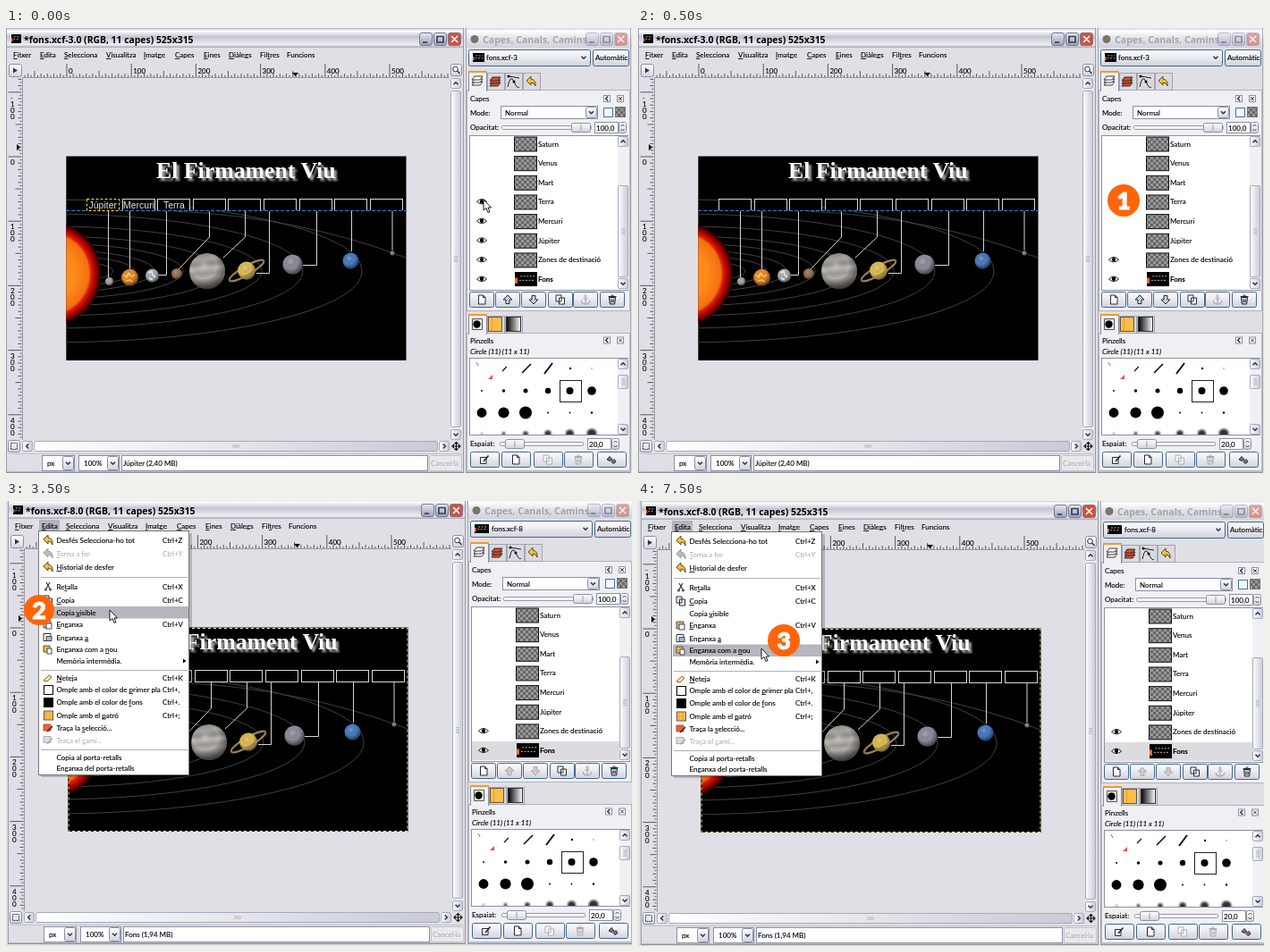
These frames come from a looping animation (700 by 498 pixels, 8000 ms). An HTML page:

```html
<!DOCTYPE html>
<html lang="ca">
<head>
<meta charset="utf-8">
<title>Editor d'imatges</title>
<style>
html, body { margin: 0; width: 100%; height: 100%; overflow: hidden; background: #e0dfe5; }
svg { display: block; width: 700px; height: 498px; }
text { font: 8px Lato, sans-serif; white-space: pre; fill: #000; stroke: #000; stroke-width: .12px; }
text.off { fill: #a5a5ad; stroke: none; }
text.bold { font-weight: bold; }
text.italic { font-style: italic; }
text.title { font: bold 10.4px "Noto Sans", sans-serif; stroke: none; }
text.dock { font: bold 10.6px "Noto Sans", sans-serif; fill: #a4a4ab; stroke: none; }
text.heading { font: bold 25.8px "Liberation Serif", serif; fill: #fff; stroke: none; }
text.label { font: 10.5px "Liberation Sans", sans-serif; fill: #e4e4e4; stroke: none; }
text.badge { font: 900 27px Lato, sans-serif; fill: #fff; stroke: #fff; stroke-width: .8px; text-anchor: middle; }
</style>
</head>
<body>
<svg viewBox="0 0 700 498">
  <defs>
    <linearGradient id="bar" x2="0" y2="1">
      <stop stop-color="#b4b4c4"/><stop offset=".14" stop-color="#fff"/><stop offset=".45" stop-color="#c4c4d2"/>
      <stop offset=".85" stop-color="#eeeef3"/><stop offset="1" stop-color="#a6a6b6"/>
    </linearGradient>
    <linearGradient id="idle" x2="0" y2="1">
      <stop stop-color="#d4d4dc"/><stop offset=".15" stop-color="#fff"/><stop offset=".5" stop-color="#e4e4ec"/>
      <stop offset="1" stop-color="#d2d2dc"/>
    </linearGradient>
    <linearGradient id="button" x2="0" y2="1"><stop stop-color="#fff"/><stop offset="1" stop-color="#d2d2de"/></linearGradient>
    <linearGradient id="frame" x2="0" y2="1"><stop stop-color="#e6e7f0"/><stop offset="1" stop-color="#9a9fba"/></linearGradient>
    <linearGradient id="thumb" x2="1"><stop stop-color="#fff"/><stop offset="1" stop-color="#cacad8"/></linearGradient>
    <linearGradient id="fade"><stop/><stop offset="1" stop-color="#fff"/></linearGradient>
    <radialGradient id="sun">
      <stop offset=".5" stop-color="#ff8a1c"/><stop offset=".77" stop-color="#f4700f"/><stop offset=".82" stop-color="#d81804"/>
      <stop offset=".9" stop-color="#a00"/><stop offset="1" stop-color="#200"/>
    </radialGradient>
    <radialGradient id="shade" cx=".4" cy=".35" r=".65">
      <stop stop-color="#fff" stop-opacity=".3"/><stop offset=".55" stop-opacity="0"/><stop offset="1" stop-opacity=".5"/>
    </radialGradient>
    <linearGradient id="bands" x2=".1" y2="1">
      <stop stop-color="#85827d"/><stop offset=".2" stop-color="#aeaca8"/><stop offset=".34" stop-color="#94908b"/>
      <stop offset=".46" stop-color="#bfbdba"/><stop offset=".6" stop-color="#a49d96"/><stop offset=".72" stop-color="#b4b2ae"/>
      <stop offset="1" stop-color="#75726e"/>
    </linearGradient>
    <pattern id="checker" width="6" height="6" patternUnits="userSpaceOnUse">
      <path d="M0 0h6v6h-6z" fill="#999"/><path d="M0 0h3v3h-3zM3 3h3v3h-3z" fill="#666"/>
    </pattern>
    <filter id="soft"><feGaussianBlur stdDeviation="1.3"/></filter>
    <clipPath id="picture"><path d="M67.300 143.600h380.200v228.400h-380.200z"/></clipPath>
    <clipPath id="brushes"><path d="M520 370h164v85h-164z"/></clipPath>
  </defs>
  <g id="stage"></g>
</svg>
<script>
const GREY = '#e0dfe5', PAGE = '#f0f0f4', EDGE = '#8a90a4', BLUE = '#42688f', ORANGE = '#ff6508', OFF = '#aaaab2';
const SCALE = 0.722;

const path = (d, stroke = '#000', width = 1, fill = 'none', extra = '') =>
  `<path d="${d}" stroke="${stroke}" stroke-width="${width}" fill="${fill}" ${extra}/>`;
const fill = (x, y, w, h, color) => `<rect x="${x}" y="${y}" width="${w}" height="${h}" fill="${color}"/>`;
const box = (x, y, w, h, color, edge = EDGE, r = 0) =>
  `<rect x="${x + .5}" y="${y + .5}" width="${w - 1}" height="${h - 1}" rx="${r}" fill="${color}" stroke="${edge}"/>`;
const dot = (x, y, r, color = '#000', extra = '') => `<circle cx="${x}" cy="${y}" r="${r}" fill="${color}" ${extra}/>`;
const at = (x, y, content) => `<g transform="translate(${x} ${y})">${content}</g>`;
// An underscore marks the letter that is underlined.
const text = (x, y, s, cls = '') =>
  `<text x="${x}" y="${y}" class="${cls}">${s.replace(/_(.)/, '<tspan text-decoration="underline">$1</tspan>')}</text>`;
const each = (list, draw) => list.map(draw).join('');
const range = n => [...Array(n).keys()];
const button = (x, y, w, h, edge = BLUE) => box(x, y, w, h, 'url(#button)', edge, 2);
const chevron = (x, y, angle = 0) =>
  path('M-2.5-1.2L0 1.3L2.5-1.2', '#2c3448', 1.5, 'none', `transform="translate(${x} ${y}) rotate(${angle})"`);

const icons = {
  page: c => path('M-3.5-5h5l2.5 2.5v7.5h-7.5zM1.5-5v2.5h2.5', c, 1, '#fff'),
  up: c => path('M0-5L5 0H2V4.500H-2V0H-5z', c, 1, c === OFF ? '#ccc' : '#c4d2e4'),
  down: c => `<g transform="scale(1 -1)">${icons.up(c)}</g>`,
  copy: c => path('M-5-5h6v7h-6zM-1.500-2h6v7h-6z', c, 1, '#fff'),
  anchor: c => path('M0-3V5M-5 1Q-4 5 0 5Q4 5 5 1M-2.500-1H2.500', c, 1.2) + `<circle cy="-4" r="1.300" fill="none" stroke="${c}"/>`,
  trash: c => path('M-3.500-2.500h7l-.8 7.500h-5.400zM-4.500-3.500h9M-1.500-4.800h3M-1 0v3M1.200 0v3', c, 1, c === OFF ? '#ddd' : '#b4bcc6'),
  edit: c => path('M-4.500-2.500h6.500v7h-6.500z', c, 1, '#fff') + path('M-1 2L4.500-4.500', c, 1.6),
  refresh: c => path('M-5 0L-2-3.500L1 0L-2 1.500zM0 2.500L3-.5L5 2.500L2 4.500z', c, 1, '#778'),
  undo: c => path('M-5-1L0-6V-3Q6-2 5 5Q3.500 .5 0 1V4z', c === OFF ? '#999' : '#4d3c14', .9, c === OFF ? '#bbb' : '#f3c33c'),
  cut: () => path('M-2-5L2 2M2-5L-2 2', '#333', 1.2) + dot(-2.5, 3, 1.6, '#555') + dot(2.5, 3, 1.6, '#555'),
  paste: () => path('M-5-4h8v8h-8z', '#654', 1, '#c9ad78') + path('M-2-1h6v6h-6z', '#445', 1, '#fff'),
  pasteInto: () => path('M-5-4h8v8h-8z', '#333', 1, '#fff') + path('M-2-1h6v5h-6z', '#445', 1, '#aab8d0'),
  pasteNew: () => path('M-5-4h7v7h-7z', '#654', 1, '#e7bc48') + path('M-1-1h5v6h-5z', '#445', 1, '#fff'),
  clear: () => path('M-5 3L1-3L4-1L-1 4z', '#86653b', 1, '#f4e29a'),
  white: () => box(-5, -5, 11, 11, '#fff', '#000'),
  black: () => fill(-5, -5, 11, 11, '#000'),
  pattern: () => box(-5, -5, 11, 11, '#ffbd4a', '#654') + path('M-2-4V5M2-4V5', '#e99d2b', 1),
  stroke: c => path('M-5-4h8v7h-8z', c === OFF ? OFF : '#c44', 1, c === OFF ? '#ddd' : '#e8642c') + path('M-1 4L5-2', c, 1.5),
};
const icon = (name, x, y, color = '#222a36') => at(x, y, icons[name](color));

const eye = y => path(`M526.500 ${y}Q532 ${y - 6} 537.500 ${y}Q532 ${y + 5} 526.500 ${y}z`, '#222', 1, '#fff') + dot(532, y - .3, 2.2);
const pointer = (x, y) => at(x, y, path('M0 0V12L3 9.500L5 14.500L7 13.500L5 9H8.500z', '#000', .9, '#fff'));
const badge = (x, y, n, r = 18) => dot(x, y, r, ORANGE) + text(x, y + 10, n, 'badge');
const thumbnail = (x, y, w, h) => fill(x, y, w, h, '#000') + fill(x, y + h * .4, w * .12, h * .4, ORANGE)
  + path(`M${x + w * .25} ${y + h * .3}H${x + w * .9}M${x + w * .2} ${y + h * .58}H${x + w * .85}`, '#bbb', 1, 'none', 'stroke-dasharray="2 1.5"');

function scrollbar(x, y, length, from, to, vertical) {
  const size = 12, mid = (from + to) / 2;
  const bar = (a, n, style) => vertical ? box(x, a, size, n, style, '#a6aabc', 1.5) : box(a, y, n, size, style, '#a6aabc', 1.5);
  const start = vertical ? y : x, end = start + length;
  const grip = each([-3, -1, 1, 3], d => vertical
    ? path(`M${x + 4} ${mid + d}h4`, '#9aa', .7) : path(`M${mid + d} ${y + 4}v4`, '#9aa', .7));
  return (vertical ? fill(x, y, size, length, '#f1f1f5') : fill(x, y, length, size, '#f1f1f5'))
    + bar(from, to - from, 'url(#thumb)') + grip + bar(start, size, 'url(#thumb)') + bar(end - size, size, 'url(#thumb)')
    + (vertical ? chevron(x + 6, y + 6, 180) + chevron(x + 6, end - 6) : chevron(x + 6, y + 6, 90) + chevron(end - 6, y + 6, -90));
}

const windowButton = (x, mark, color, ink) => box(x - 7, 5, 15, 15, color, '#777b90', 2.5)
  + path(mark, ink, 1.7, 'none', `transform="translate(${x + .5} 12.500)"`);
const windowButtons = (x, active) => `<g opacity="${active ? 1 : .5}">`
  + windowButton(x - 32, 'M-3.500 3.500H1.500', 'url(#frame)', '#3b3f52')
  + windowButton(x - 16, 'M-3.500-3h7v6.500h-7z', 'url(#frame)', '#3b3f52')
  + windowButton(x, 'M-3.500-3.500L3.500 3.500M3.500-3.500L-3.500 3.500', '#d5503e', '#fff') + '</g>';

function rulers() {
  let out = '';
  const tick = u => u % 100 === 0 ? 15 : u % 50 === 0 ? 7 : u % 10 === 0 ? 4 : 2;
  for (let u = -65; u <= 590; u += 5) {
    const x = 68 + u * SCALE;
    out += path(`M${x} 55v${-tick(u)}`, '#222', .7);
    if (u >= 0 && u % 100 === 0) out += text(x + 2, 50.5, `${u}`);
  }
  for (let u = -120; u <= 435; u += 5) {
    const y = 144 + u * SCALE;
    out += path(`M17.500 ${y}h${-tick(u)}`, '#222', .7);
    if (u % 100 === 0) out += each([...`${u}`], (c, i) => text(5, y + 9 + i * 7, c));
  }
  return out + path('M320 50h7l-3.500 4z', 'none', 0, '#000') + path('M12 130v7l4-3.500z', 'none', 0, '#000');
}

function solarPicture(guide, labels) {
  const orbits = [[72, 13], [96, 18], [118, 24], [150, 31], [190, 39], [238, 50], [284, 64], [350, 80]];
  const leaders = ['M114.500 205V279', 'M138.500 205V270', 'M179.500 205V276.500H171', 'M227.500 205V234L193 270',
    'M267.500 205V234L243 257', 'M294.500 205V274.500H280', 'M347.500 205V265.500H332', 'M386.500 205V250', 'M432 205V249'];
  const planets = [[115.500, 283.500, 4.5, '#a5a5a5'], [138.500, 279, 9.3, '#e58a2c'], [163.500, 277, 7.5, '#a6acb4'],
    [191, 275, 6, '#99765b'], [225, 272, 20, 'url(#bands)'], [269, 271.500, 10, '#dfbd55'],
    [320.500, 264.500, 11, '#8d8d9d'], [385.500, 260.500, 9, '#487cc0'], [432, 252, 2.5, '#8b8580']];
  const ring = half => path(`M-22 0A22 5 0 0 ${half} 22 0`, '#9a8358', 2.2, 'none', 'transform="translate(269 271.500) rotate(-30)"');
  const dashed = (d, color, dash) => path(d, '#000') + path(d, color, 1, 'none', `stroke-dasharray="${dash}"`);
  return `<g clip-path="url(#picture)">` + fill(67, 143, 381, 230, '#000')
    + each(orbits, ([rx, ry]) => `<ellipse cx="48" cy="272" rx="${rx}" ry="${ry}" fill="none" stroke="#404040"/>`)
    + path('M190 205Q330 212 447 257', '#404040')
    + dot(48, 275, 58, 'url(#sun)')
    + `<g filter="url(#soft)" opacity=".65">${text(171, 171, 'El Firmament Viu', 'heading')}</g>`
    + text(168, 168, 'El Firmament Viu', 'heading')
    + each(leaders, d => path(d, '#d4d4d4'))
    + each(range(9), i => box(Math.round(90 + i * 39.6), 191, 37, 14, '#000', '#d8d8d8'))
    + each(planets, ([x, y, r, color], i) => (i === 5 ? ring(1) : '') + dot(x, y, r, color) + dot(x, y, r, 'url(#shade)') + (i === 5 ? ring(0) : ''))
    + path('M132 276l3 3l2-5l3 4l4-2M134 283l4-1l4 2', '#ffcc50', 1.3)
    + path('M159 274l4-2l1 4l3 3M160 280l4 2', '#e8e8e8', 1.5)
    + (guide ? dashed('M67 204.500H448', '#2a82e0', '4 2') : dashed('M68 144.500h379v227h-379z', '#f5ec9a', '3 3'))
    + (labels ? dashed('M90.500 191.500h36v13h-36z', '#ffe84a', '3 2') + text(92.5, 202, 'Júpiter', 'label')
      + text(131, 202, 'Mercuri', 'label') + text(176, 202, 'Terra', 'label') : '')
    + '</g>';
}

const menuBar = [[8, '_Fitxer'], [38, '_Edita'], [65, '_Selecciona'], [112, '_Visualitza'], [154, '_Imatge'], [189, '_Capes'],
  [221, '_Eines'], [249, '_Diàlegs'], [284, 'Fil_tres'], [314, 'Funcions']];

function mainWindow({ version, status, guide, labels }) {
  return fill(0, 0, 512, 22, 'url(#bar)') + path('M.5 -4V497H511.500V-4', '#9a9aaa')
    + thumbnail(6, 7, 11, 10) + text(20, 17, `*fons.xcf-${version}.0 (RGB, 11 capes) 525x315`, 'title')
    + windowButtons(501, true)
    + (guide ? '' : fill(35, 23, 23, 13, '#b4b4be'))
    + each(menuBar, ([x, s]) => text(x, 33, s))
    + rulers() + button(3, 40, 15, 15, EDGE) + path('M8 44.500l5 3l-5 3z', 'none', 0, '#334')
    + path('M18.500 461V55.500H496', '#99a')
    + button(497, 40, 13, 14, EDGE) + `<circle cx="502.500" cy="46" r="2.800" fill="#fff" stroke="#334"/>` + path('M504.500 48l3 3', '#334', 1.4)
    + solarPicture(guide, labels)
    + scrollbar(497, 56, 405, 70, 447, true) + scrollbar(18, 462, 478, 31, 483, false)
    + button(2, 461, 14, 14, EDGE) + path('M5.500 464.500h7v7h-7z', '#334', 1, 'none', 'stroke-dasharray="2 1"')
    + path('M499 468h9M503.500 463.500v9M501.500 465.500l2-2l2 2M501.500 470.500l2 2l2-2M501 466l-2 2l2 2M506 466l2 2l-2 2', '#111', 1.1)
    + path('M2 476.500H510', '#c4c4cc')
    + box(40, 478, 37, 18, '#fff') + text(46, 490, 'px') + button(63, 479, 13, 16, EDGE) + chevron(69.5, 487)
    + box(81, 478, 46, 18, '#fff') + text(87, 490, '100%') + button(113, 479, 13, 16, EDGE) + chevron(119.5, 487)
    + box(129, 478, 343, 18, '#fff') + text(131, 490, status)
    + box(473, 478, 37, 18, '#e9e9ed', '#c4c4ca', 2) + text(475, 490, 'Cancel·la', 'off');
}

const tabs = (y, count, bottom) => box(515, y + 21, 183, bottom - y - 21, PAGE, '#b0b2c0')
  + box(517, y, 21, 23, PAGE) + fill(518, y + 20, 19, 3, PAGE) + fill(517, y, 21, 2, '#f39b28')
  + each(range(count - 1), i => box(538 + i * 20, y + 2, 20, 20, '#d9d9e0', '#a5a5b3'));
const panelHead = (y, s) => text(519, y, s) + box(668, y - 7, 8, 8, '#fff') + chevron(672, y - 3, 90)
  + box(683, y - 7, 8, 8, '#fff') + path(`M685 ${y - 5}l4 4m0-4l-4 4`, '#333');
const spin = (x, y, s) => box(x, y, 27, 13, '#fff') + text(x + 2, y + 9.5, s) + button(x + 27, y, 9, 13, EDGE)
  + path(`M${x + 29.500} ${y + 5}l2-2l2 2M${x + 29.500} ${y + 8}l2 2l2-2`, '#445');
const slider = (x, y, w, knob) => box(x, y - 2, w, 5, '#f3f3f6', '#9a9aaa', 1) + button(knob, y - 5, 22, 11, EDGE)
  + path(`M${knob + 11} ${y - 3}v7`, '#99a');
const stack = (x, y, color) => each([3, 0, -3], d => path(`M${x - 6} ${y + d + 2}l3-4h9l-3 4z`, '#222', .9, color));

function brushes() {
  const columns = [532, 556.5, 581, 606, 630.5, 655];
  const radii = [[1, 1.7, 2.5, 3.2, 4, 4.8], [5.4, 6.1, 7, 1, .9, 1.2]];
  return '<g clip-path="url(#brushes)">'
    + path('M526 374l2 4', '#777') + path('M555 384l5-5', '#111', 1.2) + path('M577 386l10-10', '#111', 1.6)
    + path('M602 387l9-12', '#111', 2) + dot(631, 381, 1.2) + dot(655, 381, .8, '#888')
    + path('M544 388v5h-5z', 'none', 0, '#e5533d')
    + box(619, 394, 25, 25, '#fff', '#222')
    + each(radii, (row, j) => each(row, (r, i) => dot(columns[i], 406 + j * 24.5, r)))
    + `<g filter="url(#soft)">${each(columns, (x, i) => dot(x, 454, 1 + i * .9, '#333'))}</g></g>`;
}

function dockWindow({ version, eyes, selected }) {
  const layers = ['Saturn', 'Venus', 'Mart', 'Terra', 'Mercuri', 'Júpiter', 'Zones de destinació', 'Fons'];
  const rowY = i => 129.5 + i * 21.65;
  const quiet = selected ? OFF : undefined;
  const layerButtons = [['page', 532], ['up', 561, quiet], ['down', 590, quiet], ['copy', 620], ['anchor', 648, OFF], ['trash', 678]];
  const brushButtons = [['edit', 535], ['page', 570], ['copy', 606, OFF], ['trash', 640, OFF], ['refresh', 677]];
  return fill(514, 0, 186, 22, 'url(#idle)') + path('M514.500 -4V497H698.500V-4', '#a9a9b6')
    + dot(524, 12.5, 4.5, '#7c7468') + text(533, 17, 'Capes, Canals, Camins...', 'dock') + windowButtons(687, false)
    + button(517, 24, 137, 19) + thumbnail(522, 28, selected ? 16 : 13, 10) + text(selected ? 541 : 537, 36, `fons.xcf-${version}`) + chevron(646, 33)
    + button(656, 24, 41, 19) + text(659, 36, 'Automàtic')
    + tabs(48, 4, 317) + stack(527, 59, '#fff') + stack(547, 60, '#d84b32')
    + path('M561 66Q564 51 568 60T574 66M562 54L574 56', '#222') + dot(562, 54, 1.5) + dot(568, 60, 1.5) + icon('undo', 587, 60)
    + panelHead(82, 'Capes')
    + text(519, 97.5, 'Mode:') + box(553, 87, 109, 15, '#fff') + text(558, 97.5, 'Normal') + button(648, 88, 13, 13, EDGE) + chevron(654.5, 94.5)
    + box(668, 89, 11, 11, '#f4f8ff', '#4a719b') + box(681, 88, 12, 12, 'url(#checker)', '#777')
    + text(519, 114, 'Opacitat:') + slider(554, 111, 101, 632) + spin(658, 105, '100,0')
    + box(518, 120, 178, 174, '#fff') + (selected ? fill(519, 271, 165, 21, '#dcdce0') : '')
    + each(layers, (name, i) => {
      const y = rowY(i), last = i === 7;
      return (last ? thumbnail(569, y - 8, 25, 16) : box(568, y - 8, 26, 17, 'url(#checker)', '#111'))
        + text(595, y + 3, name, last ? 'bold' : '') + (i >= eyes ? eye(y) : '');
    })
    + scrollbar(684, 121, 171, 176, 279, true)
    + each(layerButtons, ([name, x, color]) => button(x - 14, 295, 28, 18) + icon(name, x, 304, color))
    + tabs(320, 3, 496) + dot(526.5, 331.5, 4.2) + path('M521.500 325.500h11v12h-11z', '#555')
    + box(539, 323, 16, 17, '#ffbd4a', '#654') + path('M543.500 324v15', '#ec9c31') + box(559, 323, 17, 17, 'url(#fade)', '#333')
    + panelHead(352.5, 'Pinzells') + text(519, 364.5, 'Circle (11) (11 x 11)', 'italic')
    + box(518, 369, 178, 87, '#fff') + brushes() + scrollbar(684, 370, 85, 388, 404, true)
    + text(519, 467.5, 'Espaiat:') + slider(552, 465, 94, 558) + spin(650, 459, '20,0')
    + each(brushButtons, ([name, x, color]) => button(x - 16, 474, 33, 18) + icon(name, x, 483, color));
}

// Rows: y, label, shortcut, icon, disabled
const menuRows = [[46, 'Desfés Selecciona-ho tot', 'Ctrl+Z', 'undo'], [61, '_Torna a fer', 'Ctrl+Y', 'undo', true],
  [76, '_Historial de desfer', '', 'undo'], [98, 'Re_talla', 'Ctrl+X', 'cut'], [113, '_Copia', 'Ctrl+C', 'copy'], [126.5, 'Copia _visible'],
  [140, '_Enganxa', 'Ctrl+V', 'paste'], [154.5, 'Enganxa _a', '', 'pasteInto'], [168, 'Enganxa com a _nou', '', 'pasteNew'],
  [181, 'Memòria intermèdia.'], [200, '_Neteja', 'Ctrl+K', 'clear'], [213, 'Omple amb el color de _primer pla', 'Ctrl+,', 'white'],
  [227, 'Omple amb el color de _fons', 'Ctrl+.', 'black'], [241.5, 'Omple amb el _patró', 'Ctrl+;', 'pattern'],
  [256, 'Traça la _selecció...', '', 'stroke'], [269.5, 'Traça el _camí...', '', 'stroke', true],
  [289, 'Copia al porta-retalls'], [301, 'Enganxa del porta-retalls']];

function editMenu(hover) {
  return fill(37, 38, 169, 273, '#0003') + box(34, 35, 169, 274, '#fff', '#777')
    + fill(36, menuRows[hover][0] - 6.5, 166, 13.5, '#b6b6be')
    + each([87, 191, 280], y => path(`M37 ${y + .5}H201`, '#b0b0b8'))
    + each(menuRows, ([y, label, keys = '', art, off]) => {
      const cls = off ? 'off' : '';
      return (art ? icon(art, 45, y, off ? OFF : undefined) : '') + text(54.5, y + 3, label, cls) + text(173, y + 3, keys, cls);
    })
    + path('M196 178.500l3.500 2.500l-3.500 2.500z', 'none', 0, '#000');
}

const first = { version: 3, status: 'Júpiter (2,40 MB)', guide: true, selected: false, offset: [0, 0] };
const later = { version: 8, status: 'Fons (1,94 MB)', guide: false, selected: true, eyes: 6 };
const scenes = [
  { ...first, until: 500, labels: true, eyes: 3, overlay: pointer(534, 192) },
  { ...first, until: 3500, labels: false, eyes: 6, overlay: badge(543, 193, '1') },
  { ...later, until: 7500, offset: [2, -2], hover: 5, overlay: badge(37, 122, '2', 17) + pointer(116, 122) },
  { ...later, until: 8000, offset: [3, -1], hover: 8, overlay: badge(163, 156, '3') + pointer(138, 165) },
];
const pictures = scenes.map(s => fill(0, 0, 700, 498, GREY)
  + at(...s.offset, mainWindow(s) + dockWindow(s) + path('M0 497.500H512M514 497.500H699', '#8e8e9c') + (s.hover ? editMenu(s.hover) : ''))
  + s.overlay);

const stage = document.getElementById('stage');
let shown = -1;
function draw() {
  const time = performance.now() % 8000;
  const index = scenes.findIndex(s => time < s.until);
  if (index !== shown) stage.innerHTML = pictures[shown = index];
  requestAnimationFrame(draw);
}
draw();
</script>
</body>
</html>
```
